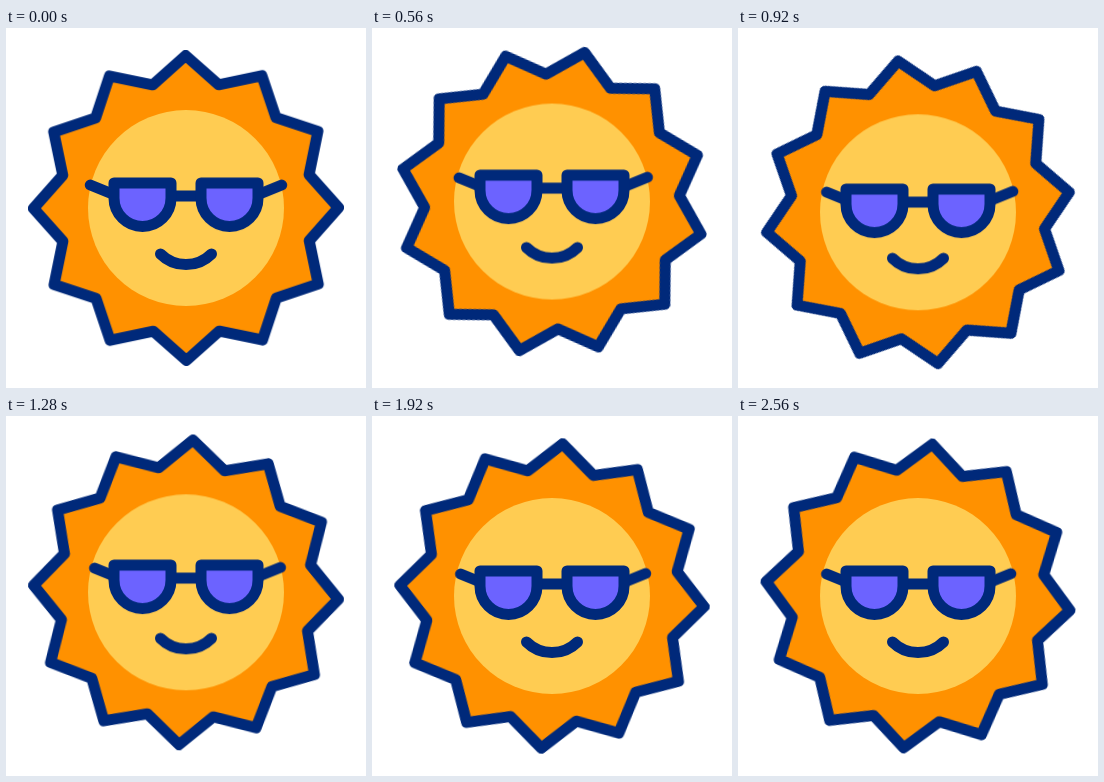
An HTML page for the animation above (2.6 s loop, 360 by 360 pixels).

```html
<!DOCTYPE html>
<html lang="en">
<head>
<meta charset="utf-8">
<title>Sun with sunglasses</title>
<style>
  html, body { margin: 0; width: 100%; height: 100%; overflow: hidden; background: #fff; }
  svg { display: block; width: 100vw; height: 100vh; }

  .line { stroke: #00297a; stroke-width: 11; stroke-linecap: round; stroke-linejoin: round; }
  .rays { fill: #ff9100; transform-origin: 180px 180px; animation: spin 2.6s linear infinite; }
  .lens { fill: #6c63ff; }
  .open { fill: none; }

  .body, .glasses, .arm {
    animation: 2.6s cubic-bezier(.333, 0, .667, 1) infinite;
  }
  .body { animation-name: bob; }
  .glasses { animation-name: bob-glasses; }
  .arm { animation-name: tuck; }

  @keyframes spin { to { transform: rotate(-360deg); } }

  @keyframes bob {
    0% { transform: translateY(0); }
    12.31% { transform: translateY(12px); }
    24.62% { transform: translateY(-9.8px); }
    38.2% { transform: translateY(6px); }
    52.31% { transform: translateY(-5px); }
    66.5%, 100% { transform: translateY(0); }
  }

  @keyframes bob-glasses {
    0% { transform: translateY(0); }
    12.7% { transform: translateY(15px); }
    25% { transform: translateY(-13.2px); }
    38.46% { transform: translateY(9px); }
    52.5% { transform: translateY(-8.2px); }
    69%, 100% { transform: translateY(0); }
  }

  @keyframes tuck {
    0% { transform: translate(0, 0); }
    36%, 100% { transform: translate(4.3px, 1px); }
  }
</style>
</head>
<body>
<svg viewBox="0 0 360 360">
  <g class="body">
    <polygon id="rays" class="rays line"/>
    <circle cx="180" cy="180" r="98" fill="#ffcc52"/>
    <path class="line open" d="M154.5 226A36 36 0 0 0 205.5 226"/>
  </g>
  <g class="glasses">
    <path class="line open" d="M165 168H195"/>
    <g id="side">
      <path class="arm line open" d="M84.3 157L104 165"/>
      <path class="lens line" d="M108 155H165V170A28.5 28.5 0 0 1 108 170Z"/>
    </g>
    <use href="#side" transform="matrix(-1 0 0 1 360 0)"/>
  </g>
</svg>
<script>
  const TIPS = 12, OUTER = 152.5, INNER = 127.5;
  const points = Array.from({ length: TIPS * 2 }, (_, i) => {
    const a = i * Math.PI / TIPS;
    const r = i % 2 ? INNER : OUTER;
    return [180 + r * Math.sin(a), 180 - r * Math.cos(a)].map(v => v.toFixed(2)).join();
  });
  document.getElementById('rays').setAttribute('points', points.join(' '));
</script>
</body>
</html>
```
